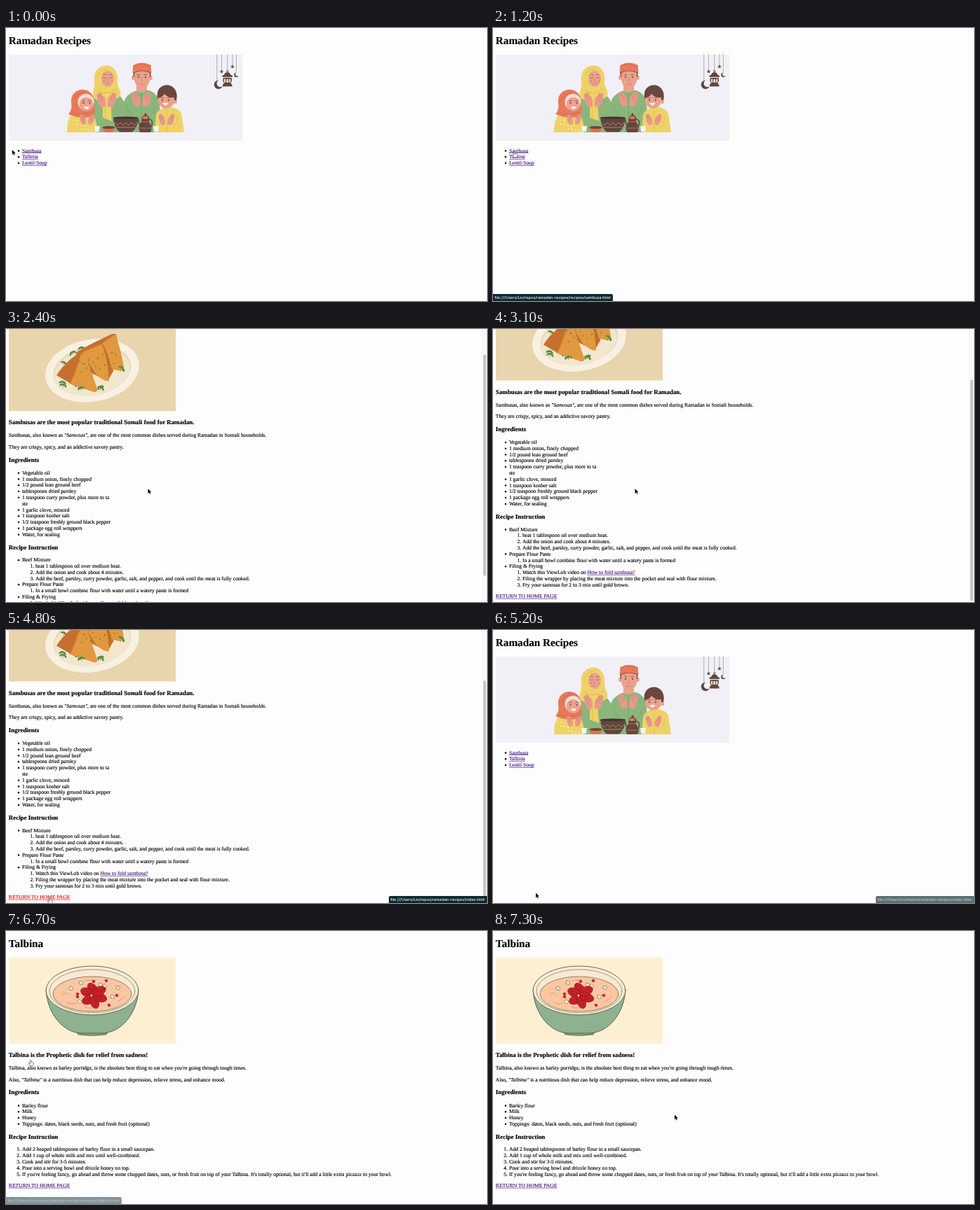
An HTML page with a canvas for the animation above (8 s loop, 686x390 px).

```html
<!DOCTYPE html>
<html lang="en">
<head>
<meta charset="utf-8">
<title>Ramadan Recipes</title>
<style>
html, body { margin: 0; width: 100%; height: 100%; overflow: hidden; background: #fdfdfd; }
canvas { display: block; width: 686px; height: 390px; }
</style>
</head>
<body>
<canvas id="stage"></canvas>
<script>
const W = 686, H = 390, LOOP = 8000;
const SERIF = '"Liberation Serif", "Times New Roman", serif';
const BODY = 7.62, H1 = 15.24, H3 = 8.92, LINE = 8.8;
const LEFT = 3.8, INDENT = 22.9, NESTED = 42;
const VISITED = '#451580';

const canvas = document.getElementById('stage');
const ctx = canvas.getContext('2d');
const dpr = window.devicePixelRatio || 1;
canvas.width = W * dpr;
canvas.height = H * dpr;

// ---------- drawing helpers ----------
function rect(color, x, y, w, h) {
  ctx.fillStyle = color;
  ctx.fillRect(x, y, w, h);
}
function oval(color, x, y, rx, ry = rx, rot = 0) {
  ctx.beginPath();
  ctx.ellipse(x, y, rx, ry, rot, 0, Math.PI * 2);
  ctx.fillStyle = color;
  ctx.fill();
}
function ring(color, width, x, y, rx, ry, rot = 0) {
  ctx.beginPath();
  ctx.ellipse(x, y, rx, ry, rot, 0, Math.PI * 2);
  ctx.strokeStyle = color;
  ctx.lineWidth = width;
  ctx.stroke();
}
function shape(color, d) {
  ctx.fillStyle = color;
  ctx.fill(new Path2D(d));
}
function stroke(color, width, d) {
  ctx.strokeStyle = color;
  ctx.lineWidth = width;
  ctx.stroke(new Path2D(d));
}
function at(x, y, draw, sx = 1, rot = 0) {
  ctx.save();
  ctx.translate(x, y);
  ctx.rotate(rot);
  ctx.scale(sx, 1);
  draw();
  ctx.restore();
}

// ---------- text helpers ----------
function write(text, x, y, size = BODY, style = '', color = '#000') {
  ctx.font = `${style} ${size}px ${SERIF}`;
  ctx.fillStyle = ctx.strokeStyle = color;
  ctx.lineWidth = 0.15; // slightly heavier stems
  ctx.fillText(text, x, y);
  ctx.strokeText(text, x, y);
  return x + ctx.measureText(text).width;
}
function link(text, x, y, color = VISITED) {
  const end = write(text, x, y, BODY, '', color);
  rect(color, x, y + 0.8, end - x, 0.6);
}
const title = text => write(text, LEFT, 23.3, H1, 'bold');
const heading = (text, y) => write(text, LEFT, y, H3, 'bold');
const bullet = y => oval('#000', 18, y - 2.1, 1.25);
function bullets(items, y) {
  for (const item of items) {
    bullet(y);
    for (const line of item.split('\n')) {
      write(line, INDENT, y);
      y += LINE;
    }
  }
}
function numbers(items, x, y) {
  items.forEach((item, i) => {
    const mark = i + 1 + '.';
    write(mark, x - 7.6, y + i * LINE);
    write(item, x, y + i * LINE);
  });
}

// ---------- home illustration ----------
const SKIN = '#eba28d', PALM = '#e8998a', SHADE = '#c97868', YELLOW = '#efd266', GREEN = '#8ab67b';
const ORANGE = '#e8795a', BROWN = '#5f4740', HAIR = '#69473f';

function hands(x, y, k, gap) {
  for (const side of [-1, 1]) {
    at(x + side * gap, y, () => {
      ctx.scale(k, k);
      shape(PALM, 'M-4 10Q-6 4-5-2Q-5-4-3-3L-2-8Q-1-10 0-8L1-10Q3-10 3-8L4-8Q6-7 5-3C6 3 4 8 2 11Z');
      stroke(SHADE, 0.5, 'M0-8L-.6-2M3-7.5L2-1M-3-3Q-1 2 3 3');
    }, side, side * 0.2);
  }
}
function smile(x, y, w) {
  shape('#fff', `M${x - w} ${y}Q${x} ${y + w * 1.7} ${x + w} ${y}Z`);
}
function closedEyes(x, y, gap) {
  for (const s of [-1, 1]) {
    stroke(BROWN, 0.6, `M${x + s * gap - 2} ${y}q2 1.6 4 0m-4-4q2-1.5 4 0`);
  }
}
function openEyes(x, y, gap) {
  for (const s of [-1, 1]) {
    oval(BROWN, x + s * gap, y, 0.9, 1.2);
    stroke(BROWN, 0.7, `M${x + s * gap - 2} ${y - 3.2}q2-1.4 4 0`);
  }
}
function father() {
  shape(GREEN, 'M164 149L168 106Q170 96 184 90L204 89Q215 93 219 105L221 149Z');
  stroke('#6f9b63', 0.6, 'M193 92V149M171 112Q176 122 180 126M213 112Q210 122 206 127');
  shape(SKIN, 'M186 78H201V89Q194 95 186 90Z');
  oval(SKIN, 181.5, 71, 2.3, 3.3);
  oval(SKIN, 206.5, 71, 2.3, 3.3);
  shape(HAIR, 'M181 61H207L206 70H182Z');
  shape(SKIN, 'M183 64Q194 59 205 64L205 76Q202 86 194 86Q185 85 183 75Z');
  shape(ORANGE, 'M180.5 64L181.5 53Q194 46.5 206.5 53L207.5 64Q194 58 180.5 64Z');
  stroke('#c9634a', 0.6, 'M181.5 55Q194 49 206.5 55');
  openEyes(194, 70, 5);
  stroke(SHADE, 0.7, 'M194 71l-1 5h2M190 80q4 2 8 0');
  hands(193, 101, 1.05, 7.5);
}
function mother() {
  shape(GREEN, 'M114 149L122 108Q126 97 137 93H155Q166 97 169 108L170 149Z');
  shape(YELLOW, 'M126 76C124 61 134 53.5 143 53.5C154 53.5 161 64 159 78C160 87 165 90 163 97Q156 104 149 102L151 133L138 128L138 104Q128 104 124 98C123 90 127 85 126 76Z');
  oval(SKIN, 145, 72.5, 9, 11.5);
  stroke('#d0b34f', 0.7, 'M131 68Q136 58 145 59M131 89Q144 98 158 87M141 104L142 128');
  closedEyes(145, 71, 4.3);
  oval('#e38a7c', 139.5, 76, 2, 1.3);
  oval('#e38a7c', 151, 76, 2, 1.3);
  stroke(SHADE, 0.7, 'M145 72l-1 4h2M142 79q3 2 6 0');
  hands(143.5, 102, 1.05, 7.5);
}
function girl() {
  shape(YELLOW, 'M87 149Q87 128 96 121H122Q130 130 130 149Z');
  for (let i = 0; i < 14; i++) {
    oval('#faf0bf', 90 + (i * 11) % 38, 126 + (i * 7) % 22, 0.9);
  }
  shape(ORANGE, 'M93 106C92 94 101 88 109 88C120 88 127 97 126 109C126 118 129 120 124 126Q106 131 89 123Q95 117 93 106Z');
  oval('#f5ded7', 114, 106, 11.5, 12);
  oval(SKIN, 114.5, 109, 10, 10);
  stroke('#c9634a', 0.7, 'M97 104Q101 92 113 92M94 121Q108 125 123 121');
  openEyes(115, 107, 4.5);
  smile(115, 112.5, 4);
  hands(115.5, 130, 0.75, 6);
}
function boy() {
  shape(YELLOW, 'M212 149L214 124Q218 114 230 113Q246 113 250 122L254 149Z');
  stroke('#d0b34f', 0.6, 'M230 118V149M245 128Q243 138 239 142');
  oval(SKIN, 241.5, 105, 2.5, 3.3);
  shape(HAIR, 'M216 100C214 89 220 82 229 81.5C239 81 246 91 243 103L218 104Z');
  shape(SKIN, 'M217 100Q223 99 226 94Q232 101 240 99L240 106Q237 115 228 115Q219 114 217 105Z');
  openEyes(227.5, 103, 4.5);
  smile(227.5, 107, 4);
  hands(229, 130, 0.8, 6.5);
}
function meal() {
  shape('#5f453f', 'M153 128H189Q188 142 180 148.5H162Q154 142 153 128Z');
  oval('#49322e', 171, 128.3, 18, 1.7);
  stroke('#c99a62', 0.8, 'M155 135l4 4 4-4 4 4 4-4 4 4 4-4 4 4 4-4M158 142H184');
  shape('#d77350', 'M137 142H156Q154 149 150 149H143Q138 148 137 142Z');
  oval('#6f4639', 146.5, 142, 9, 2);
  shape('#65463f', 'M191 149Q187 142 193 134L194 127Q199 121 204 127L204 134Q210 143 206 149Z');
  stroke('#65463f', 1.6, 'M204 130Q212 132 206 143M193 141Q189 138 189 131');
  oval('#65463f', 199, 123, 1.5);
  oval(ORANGE, 198.5, 128, 4, 2);
  stroke('#c58b61', 0.7, 'M193 134H205M191 143H207');
  for (const x of [126, 210]) shape('#f3f2f5', `M${x} 140h8l-1 8h-6Z`);
}
function star(x, y) {
  at(x, y, () => shape(BROWN, 'M0-3L.8-.8 3-.8 1.2.6 1.9 2.8 0 1.5-1.9 2.8-1.2.6-3-.8-.8-.8Z'));
}
function crescent(x, y, r) {
  oval(BROWN, x, y, r);
  oval('#f1f0f7', x + r * 0.45, y - r * 0.3, r * 0.83);
}
function lantern() {
  stroke('#8b7c78', 0.6, 'M300.8 38V75M307.5 38V60M315.8 38V61M323 38V53M328.4 38V63');
  crescent(303, 81, 6.2);
  crescent(328.5, 67, 3.2);
  star(307.5, 62);
  star(323, 55);
  ring(BROWN, 0.8, 315.8, 61.8, 1.3, 1.3);
  shape(BROWN, 'M311 67Q312 63.5 315.8 63Q319.5 63.5 320.5 67L323 68V70H308.5V68ZM310 71H321.5Q323 75 320.5 79L322.5 81V83.5H309V81L311 79Q308.5 75 310 71Z');
  shape('#f1f0f7', 'M311.5 78Q310.5 75 311.5 72.5H313V78ZM318.5 78V72.5H320Q321 75 320 78Z');
  shape('#f0d9b6', 'M314.2 78V74Q315.8 71.5 317.3 74V78Z');
}
function familyPicture() {
  rect('#f1f0f7', 4, 38, 333, 123);
  father();
  mother();
  girl();
  boy();
  meal();
  lantern();
}

// ---------- sambusa illustration ----------
function herb(x, y, rot) {
  at(x, y, () => {
    for (let i = -1; i <= 1; i++) oval('#5c9447', i * 3.2, Math.abs(i) * 1.3, 2.5, 1.4, i * 0.8);
    stroke('#477b39', 0.6, 'M-4 2Q0-1 4 2M0 0V4');
  }, 1, rot);
}
function sambusaPicture() {
  rect('#e8d5ae', 4, 38, 238, 123);
  oval('#f8f1e2', 123, 103, 67.5, 44.5, -0.18);
  oval('#e9dbbd', 123, 103, 56, 35.5, -0.18);
  oval('#f2e6cf', 123, 104.5, 54, 33.5, -0.18);
  [[84, 92, 0.7], [94, 77, -0.6], [108, 70, 0], [164, 91, 1.2], [165, 100, 0.3], [81, 119, 0.2],
   [104, 125, 0.4], [134, 126, -0.5], [129, 65, -0.4]].forEach(h => herb(...h));
  shape('#c6702f', 'M99 78Q116 67 151 51Q157 49 158 54L153 104L145 118L112 102Z');
  shape('#e2983e', 'M109 77L137 65Q145 86 147 118Q139 119 128 108Z');
  shape('#e2983e', 'M137 64L155 52Q158 51 159 60Q167 87 168 99L164 104L151 101Q145 77 137 64Z');
  stroke('#b9622a', 1, 'M137 64Q146 82 149 103');
  shape('#c6702f', 'M72 110Q83 92 104 78Q109 76 112 80L108 101L98 125Z');
  shape('#e2983e', 'M106 80Q111 77 114 82L130 129Q131 134 126 134L91 122Q100 101 106 80Z');
  stroke('#b9622a', 0.8, 'M106 80Q101 102 91 122');
  for (let i = 0; i < 18; i++) {
    const x = 101 + (i * 23) % 59, y = 84 + (i * 13) % 27 - (x - 101) * 0.25;
    oval(i % 3 ? '#6c953d' : '#4e8339', x, y, 1.4, 0.8, i);
  }
  herb(82, 123, 0.3);
  herb(107, 127, -0.2);
  herb(136, 127, 0.5);
  herb(166, 99, 0.8);
}

// ---------- talbina illustration ----------
const INK = '#4a493f';
function talbinaPicture() {
  rect('#fdf0d2', 4, 38, 238, 123);
  shape('#7fa681', 'M99 141H147L143 148Q122 151 103 148Z');
  stroke(INK, 0.7, 'M100 143L103 148Q122 151 143 148L146 143');
  const bowl = 'M57 84C59 120 83 146 108 146H138C164 145 187 119 189 84Z';
  shape('#8eb18f', bowl);
  stroke(INK, 0.8, bowl);
  oval('#f6ebd2', 123, 85, 66, 35);
  ring(INK, 0.8, 123, 85, 66, 35);
  ring(INK, 0.5, 123, 86, 61, 31);
  oval('#fbc6a1', 123, 90, 56, 25);
  ring(INK, 0.6, 123, 90, 56, 25);
  stroke('#b98267', 0.6, 'M80 91q5-5 9 0M87 102q6 4 13 1M112 108q8 4 17 1M159 101q7-3 10-8M113 71q7-2 14 0');
  for (const [x, y, r] of [[93, 82, 0.5], [107, 74, 0.2], [141, 79, 0.8], [152, 94, 0.1], [160, 81, 0.5], [105, 101, 0.7], [135, 77, 0.3]]) {
    at(x, y, () => {
      rect('#fff4df', -2.3, -2, 4.6, 4);
      stroke(INK, 0.5, 'M-2.3-2H2.3V2H-2.3Z');
    }, 1, r);
  }
  for (const [x, y] of [[125, 72], [143, 71], [158, 92], [147, 106], [102, 90], [102, 94]]) {
    oval('#c9292c', x, y, 2.1, 1.8, 0.4);
    ring('#7d2020', 0.4, x, y, 2.1, 1.8, 0.4);
  }
  for (const [x, y, rot] of [[124, 83, 0.9], [116, 88, 0.4], [118, 98, -0.4], [126, 101, 1.2], [134, 95, 0.3], [133, 86, -0.5]]) {
    at(x, y, () => {
      oval('#c92128', 0, 0, 10, 6.2);
      ring('#741c20', 0.6, 0, 0, 10, 6.2);
      stroke('#8d1c22', 0.5, 'M-7 0Q0-3 7 0M-5 3Q0 1 6 3');
    }, 1, rot);
  }
  oval('#efd0a2', 122, 92, 1.5);
}

// ---------- pages ----------
function homePage() {
  title('Ramadan Recipes');
  familyPicture();
  ['Sambusa', 'Talbina', 'Lentil Soup'].forEach((name, i) => {
    const y = 177.6 + i * LINE;
    bullet(y);
    link(name, INDENT, y);
  });
}
function sambusaPage(t) {
  title('Sambusa');
  sambusaPicture();
  heading('Sambusas are the most popular traditional Somali food for Ramadan.', 180);
  let x = write('Sambusas, also known as ', LEFT, 198.2);
  x = write('"Samosas"', x, 198.2, BODY, 'italic');
  write(', are one of the most common dishes served during Ramadan in Somali households.', x, 198.2);
  write('They are crispy, spicy, and an addictive savory pastry.', LEFT, 214.6);
  heading('Ingredients', 233.4);
  bullets(['Vegetable oil', '1 medium onion, finely chopped', '1/2 pound lean ground beef',
    'tablespoons dried parsley', '1 teaspoon curry powder, plus more to ta\nste',
    '1 garlic clove, minced', '1 teaspoon kosher salt',
    '1/2 teaspoon freshly ground black pepper', '1 package egg roll wrappers',
    'Water, for sealing'], 251.5);
  heading('Recipe Instruction', 358.3);
  const top = 376;
  bullets(['Beef Mixture'], top);
  numbers(['heat 1 tablespoon oil over medium heat.', 'Add the onion and cook about 4 minutes.',
    'Add the beef, parsley, curry powder, garlic, salt, and pepper, and cook until the meat is fully cooked.'],
    NESTED, top + LINE);
  bullets(['Prepare Flour Paste'], top + 4 * LINE);
  numbers(['In a small bowl combine flour with water until a watery paste is formed'], NESTED, top + 5 * LINE);
  bullets(['Filing & Frying'], top + 6 * LINE);
  const watch = 'Watch this ViewLob video on ';
  numbers([watch, 'Filing the wrapper by placing the meat mixture into the pocket and seal with flour mixture.',
    'Fry your samosas for 2 to 3 min until gold brown.'], NESTED, top + 7 * LINE);
  ctx.font = `${BODY}px ${SERIF}`;
  link('How to fold sambosa?', NESTED + ctx.measureText(watch).width, top + 7 * LINE);
  link('RETURN TO HOME PAGE', LEFT, 471.6, t >= 4800 ? '#f00000' : VISITED);
}
function talbinaPage() {
  title('Talbina');
  talbinaPicture();
  heading('Talbina is the Prophetic dish for relief from sadness!', 180);
  write("Talbina, also known as barley porridge, is the absolute best thing to eat when you're going through tough times.", LEFT, 198.2);
  let x = write('Also, ', LEFT, 214.6);
  x = write('"Talbina"', x, 214.6, BODY, 'italic');
  write(' is a nutritious dish that can help reduce depression, relieve stress, and enhance mood.', x, 214.6);
  heading('Ingredients', 233.4);
  bullets(['Barley flour', 'Milk', 'Honey',
    'Toppings: dates, black seeds, nuts, and fresh fruit (optional)'], 251.5);
  heading('Recipe Instruction', 296.8);
  numbers(['Add 2 heaped tablespoons of barley flour in a small saucepan.',
    'Add 1 cup of whole milk and mix until well-combined.', 'Cook and stir for 3-5 minutes.',
    'Pour into a serving bowl and drizzle honey on top.',
    "If you're feeling fancy, go ahead and throw some chopped dates, nuts, or fresh fruit on top of your Talbina. It's totally optional, but it'll add a little extra pizzazz to your bowl."],
    INDENT, 314.4);
  link('RETURN TO HOME PAGE', LEFT, 366);
}

// ---------- browser chrome ----------
function scrollbar(part) {
  rect('#fafafa', 679, 0, 7, H);
  rect('#ececec', 679, 0, 0.5, H);
  ctx.beginPath();
  ctx.roundRect(680.8, 1.2 + part * 71, 3.8, 316, 1.9);
  ctx.fillStyle = '#c1c1c1';
  ctx.fill();
}
function statusBar(file, alpha, right) {
  if (alpha <= 0) return;
  ctx.save();
  ctx.globalAlpha = alpha;
  ctx.font = '500 5.5px Inter, "Liberation Sans", sans-serif';
  const text = 'file:///Users/Lio/repos/ramadan-recipes/' + file;
  const w = ctx.measureText(text).width + 5.5;
  const x = right ? W - w : 0;
  ctx.beginPath();
  ctx.roundRect(x, 380, w, 12, right ? [2, 0, 0, 0] : [0, 2, 0, 0]);
  ctx.fillStyle = '#0b2a30';
  ctx.fill();
  ctx.fillStyle = '#f4f7f7';
  ctx.fillText(text, x + 2.2, 387.1);
  ctx.restore();
}

// ---------- motion ----------
const clamp = v => Math.min(1, Math.max(0, v));
const ramp = (t, a, b) => clamp((t - a) / (b - a));
const ease = p => p * p * (3 - 2 * p);
const fade = (t, on, full, off, gone) => ramp(t, on, full) * (1 - ramp(t, off, gone));

// time, x, y of the pointer tip
const PATH = [
  [0, 8.8, 174], [300, 8.8, 174], [900, 30.5, 176.5], [1800, 30.5, 176.5],
  [2100, 202.5, 228.2], [3500, 202.5, 228.2], [3800, 85, 337], [3900, 76, 395],
  [4000, 68, 395], [4100, 64, 387], [4300, 61.5, 384.5], [4500, 62, 382.3],
  [5100, 62, 382.3], [6000, 34, 187.5], [6200, 34, 187.5], [6400, 35.2, 184.2],
  [7000, 35.2, 184.2], [7300, 259, 262.5], [8000, 259, 262.5]
];
const HAND_TIMES = [[700, 1900], [4500, 5200], [6000, 7100]];

function pointerAt(t) {
  const i = PATH.findIndex(key => key[0] > t);
  const [t0, x0, y0] = PATH[i - 1], [t1, x1, y1] = PATH[i];
  const p = ease(ramp(t, t0, t1));
  return [x0 + (x1 - x0) * p, y0 + (y1 - y0) * p];
}
function pointer(t) {
  const hand = HAND_TIMES.some(([a, b]) => t >= a && t < b);
  const d = hand
    ? 'M-.8.7Q0-.4.8.7V3.2Q1.6 2.5 2.1 3.4 2.9 2.9 3.3 3.8 4.4 3.5 4.3 4.8 4.4 6.6 3.1 8.3H-.6L-3 5.3Q-3.3 4.2-2 4.3L-.8 5.3Z'
    : 'M0 0V6.8L1.6 5.4 2.7 7.9 3.8 7.4 2.7 5 4.8 4.8Z';
  at(...pointerAt(t), () => {
    if (hand) {
      shape('#fff', d);
      stroke('#333', 0.6, d);
    } else {
      stroke('#fff', 1, d);
      shape('#000', d);
    }
  });
}

function draw(t) {
  ctx.setTransform(dpr, 0, 0, dpr, 0, 0);
  ctx.textRendering = 'geometricPrecision';
  ctx.lineCap = ctx.lineJoin = 'round';
  rect('#fdfdfd', 0, 0, W, H);
  if (t >= 1300 && t < 4900) {
    const scroll = ease(ramp(t, 2200, 2600));
    at(0, -87.5 * scroll, () => sambusaPage(t));
    scrollbar(scroll);
  } else if (t >= 6600) {
    talbinaPage();
  } else {
    homePage();
  }
  statusBar('recipes/sambusa.html', fade(t, 700, 1000, 1500, 1700));
  statusBar('index.html', fade(t, 4400, 4700, 5100, 5400), true);
  statusBar('recipes/talbina.html', fade(t, 6200, 6500, 6600, 6800));
  pointer(t);
}

const start = performance.now();
function tick() {
  const t = (performance.now() - start) % LOOP;
  draw(Math.floor(t / 100) * 100);
  requestAnimationFrame(tick);
}
tick();
</script>
</body>
</html>
```
